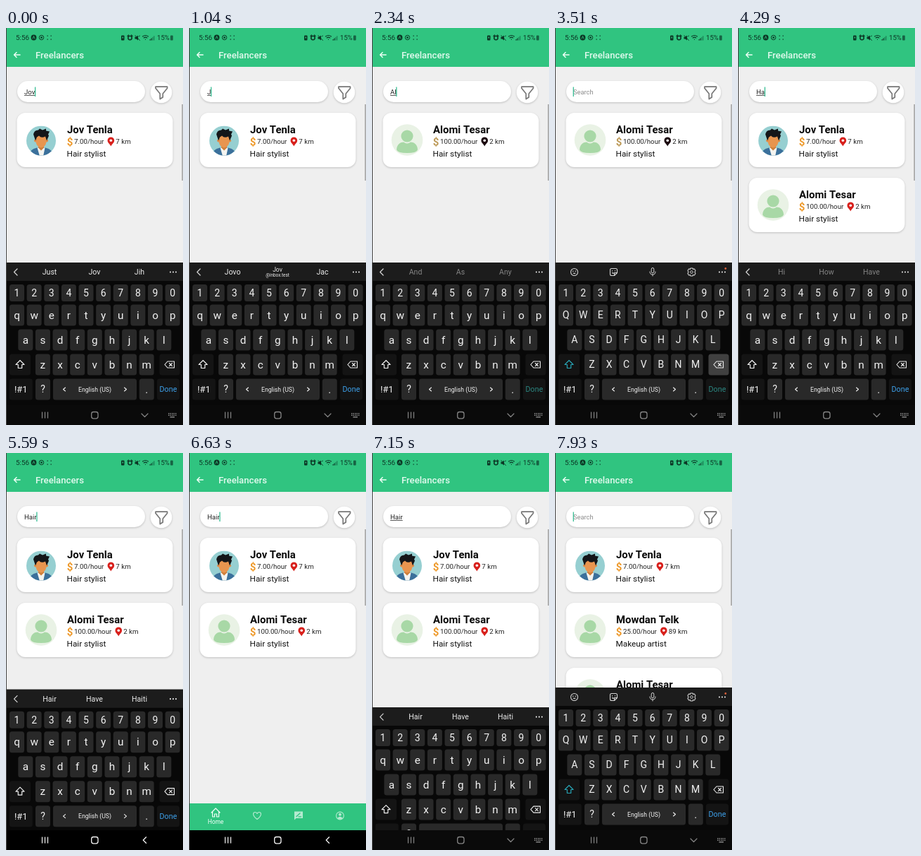
These frames come from a looping animation (252x562 px, 8000 ms). An HTML page with a canvas:

```html
<!DOCTYPE html>
<html lang="en">
<head>
<meta charset="utf-8">
<title>Freelancer search</title>
<style>
html, body { margin: 0; width: 100%; height: 100%; overflow: hidden; background: #efefef; }
canvas { display: block; width: 100vw; height: 100vh; }
</style>
</head>
<body>
<canvas id="stage"></canvas>
<script>
const W = 252, H = 562, LOOP = 8000;
const GREEN = '#30c480', KEY = '#292929', DARK_KEY = '#141414';
const canvas = document.getElementById('stage');
const ctx = canvas.getContext('2d');

const people = [
  { name: 'Jov Tenla', price: '7.00', km: 7, job: 'Hair stylist', portrait: true },
  { name: 'Mowdan Telk', price: '25.00', km: 89, job: 'Makeup artist' },
  { name: 'Alomi Tesar', price: '100.00', km: 2, job: 'Hair stylist' }
];

// Search field contents: [start time, text]
const edits = [
  [0, 'Jov'], [520, 'Jo'], [780, 'J'], [1300, ''],
  [1820, 'A'], [2210, 'Al'], [3250, 'A'], [3510, ''],
  [3900, 'H'], [4160, 'Ha'], [4420, 'Hai'], [4680, 'Hair'],
  [7410, 'Hai'], [7540, 'Ha'], [7670, 'H'], [7800, '']
];

const hints = {
  Jov: ['Just', 'Jov', 'Jih'], Jo: ['Job', 'Jov', 'Join'], J: ['Jovo', 'Jov|@inbox.test', 'Jac'],
  A: ['And', 'As', 'Any'], Al: ['All', 'Also', 'Always'],
  H: ['Hi', 'How', 'Have'], Ha: ['Have', 'Has', 'Happy'],
  Hai: ['Hair', 'Hai', 'Haiti'], Hair: ['Hair', 'Have', 'Haiti']
};

const HIDE = 5590, SHOW = 7020, SLIDE = 260;
const clamp = v => Math.max(0, Math.min(1, v));
const ease = v => 1 - (1 - v) ** 3;
const editAt = t => Math.max(0, edits.findLastIndex(e => e[0] <= t));

function box(x, y, w, h, r, fill) {
  ctx.beginPath();
  ctx.roundRect(x, y, w, h, r);
  ctx.fillStyle = fill;
  ctx.fill();
}

function disc(x, y, r, fill) {
  ctx.beginPath();
  ctx.arc(x, y, r, 0, 7);
  ctx.fillStyle = fill;
  ctx.fill();
}

function ring(x, y, r, color, width = 1) {
  ctx.beginPath();
  ctx.arc(x, y, r, 0, 7);
  ctx.strokeStyle = color;
  ctx.lineWidth = width;
  ctx.stroke();
}

function text(s, x, y, size, color, weight = 400, align = 'left') {
  ctx.font = `${weight} ${size}px Roboto, sans-serif`;
  ctx.textAlign = align;
  ctx.fillStyle = color;
  ctx.fillText(s, x, y);
  return ctx.measureText(s).width;
}

// Path around (x, y); filled when no line width is given
function shape(d, x, y, color, width) {
  ctx.save();
  ctx.translate(x, y);
  const p = new Path2D(d);
  if (width) {
    ctx.strokeStyle = color;
    ctx.lineWidth = width;
    ctx.lineJoin = ctx.lineCap = 'round';
    ctx.stroke(p);
  } else {
    ctx.fillStyle = color;
    ctx.fill(p);
  }
  ctx.restore();
}

function raised(draw) {
  ctx.save();
  ctx.shadowColor = 'rgba(0,0,0,.2)';
  ctx.shadowBlur = 3;
  ctx.shadowOffsetY = 1;
  draw();
  ctx.restore();
}

function header() {
  const ink = '#0c3524';
  box(0, 0, W, 55, 0, GREEN);
  text('5:56', 14, 17, 9.8, ink);
  disc(39.5, 13.5, 3.9, ink);
  shape('M-1.5 1.5L0-2L1.5 1.5', 39.5, 13.5, GREEN, 0.9);
  ring(50.5, 13.5, 3.2, ink, 1);
  disc(50.5, 13.5, 1.3, ink);
  for (const dx of [0, 5]) for (const dy of [0, 5]) box(58.5 + dx, 10.5 + dy, 1.3, 1.3, 0, ink);
  box(164, 10.5, 4.5, 7, 1, ink);
  box(165.5, 12.5, 1.5, 2, 0, GREEN);
  ring(176.5, 14, 2.7, ink, 1.5);
  shape('M-3.5-2.5L-2-4M3.5-2.5L2-4', 176.5, 14, ink, 1.2);
  shape('M-3.5-1.5H-1.5L1-3.5V3.5L-1.5 1.5H-3.5Z', 187, 14, ink);
  shape('M-3-3.5L3.5 3.5M2-2L3.5-3', 187, 14, ink, 0.9);
  shape('M-4-2Q0-5 4-2M-2.3 0Q0-1.8 2.3 0M0 2V2.2', 198.5, 14, ink, 1.1);
  for (let i = 0; i < 4; i++) box(204.5 + i * 1.9, 16 - i * 1.6, 1.2, 1.5 + i * 1.6, 0, i < 2 ? ink : '#1c8054');
  text('15%', 215, 17, 9.6, ink);
  box(234, 10.5, 3.8, 7, 1, '#176444');
  shape('M4.5 0H-4M-.5-3.5L-4 0L-.5 3.5', 15.5, 38, '#eafff4', 1.5);
  text('Freelancers', 42, 43, 13.2, '#e2faee', 500);
}

function searchBar(t, edit, typing) {
  raised(() => {
    box(16, 75, 182, 30, 15, '#fff');
    disc(221, 91, 15.3, '#fff');
  });
  shape('M-8.3-8.3H8.3V-6.3L2 1.5V6.5L-2 9V1.5L-8.3-6.3Z', 221.3, 91.5, '#777', 1.7);
  const s = edit[1], x = 26;
  let w = 0;
  if (s) {
    w = text(s, x, 94, 9.6, '#222');
    if (typing) box(x, 95.2, w, 0.8, 0, '#333');
  } else {
    text('Search', x, 94, 9.3, '#8c8c8c');
  }
  if ((t - edit[0]) % 900 < 500) box(x - 0.4 + w, 83.5, 1.3, 13.5, 0, '#35bd92');
}

function portrait(x, y) {
  ctx.save();
  ctx.beginPath();
  ctx.arc(x, y, 21, 0, 7);
  ctx.clip();
  box(x - 21, y - 21, 42, 42, 0, '#96cfd1');
  shape('M-17 22Q-17 12-6 10H6Q17 12 17 22Z', x, y, '#3b709b');
  shape('M-5.5 10L-2 22H3L5.5 10Z', x, y, '#f4f4f0');
  shape('M-4 5V10L0 14L4 10V5Z', x, y, '#cf7f3a');
  disc(x - 8, y, 2, '#e08d48');
  disc(x + 8, y, 2, '#e08d48');
  shape('M-7.5-8H7.5V2Q6 9 0 10Q-6 9-7.5 2Z', x, y, '#e8954f');
  shape('M-8 0L-11-9Q-10-15-4-15L-2-17L2-15L7-17L7-14L12-13L10-9L11-7L8 0L6-6Q0-3-3-7L-6-5Z', x, y, '#141619');
  ctx.restore();
}

function placeholder(x, y) {
  disc(x, y, 22.3, '#e9f2e5');
  shape('M-15 14C-15 6-9 3-5 3Q0 7 5 3C9 3 15 6 15 14Q13 18.5 0 18.5T-15 14Z', x, y, '#a8d8a6');
  disc(x, y - 5.5, 8.6, '#a8d8a6');
}

function card(p, y, muted) {
  raised(() => box(15.5, y, 222, 77, 12, '#fff'));
  if (p.portrait) portrait(50, y + 39.5);
  else placeholder(50, y + 38.5);
  text(p.name, 87, y + 28.5, 14.9, '#0a0a0a', 700);
  text('$', 86.8, y + 45.8, 15, muted ? '#bd9a58' : '#ee9a2c', 700);
  const w = text(p.price + '/hour', 97, y + 44, 9.7, '#222');
  const x = 107 + w;
  shape('M0 6.5C-1.5 3-4.8 1.5-4.8-1.8A4.8 4.8 0 1 1 4.8-1.8C4.8 1.5 1.5 3 0 6.5Z', x, y + 41, muted ? '#1c0a10' : '#d8201c');
  disc(x, y + 39.2, 1.8, '#fff');
  text(p.km + ' km', x + 7, y + 44, 9.7, '#222');
  text(p.job, 86.5, y + 62, 11.8, '#111');
}

function tabs() {
  const pale = '#b4ead0';
  box(0, 496, W, 38, 0, GREEN);
  shape('M-6 0L0-6L6 0M-4.5-1V6H-1.5V2H1.5V6H4.5V-1', 38, 509, '#f2fff8', 1.2);
  text('Home', 38, 525, 8.4, '#f2fff8', 400, 'center');
  shape('M0 5C-8-1-5.5-5-3-5Q-1-5 0-3Q1-5 3-5C5.5-5 8-1 0 5Z', 97, 513.5, pale, 1.2);
  shape('M-6-5.5H6V4H-3.5L-6 6.5Z', 156, 513, pale);
  shape('M-3 1.5L2-3M0 1.8H3.5', 156, 513, GREEN, 1.3);
  ring(215, 513.5, 5.4, pale, 1.1);
  disc(215, 511.8, 2, pale);
  shape('M-3.8 3.5Q0-1 3.8 3.5Q0 6.5-3.8 3.5Z', 215, 513.5, pale);
}

function key(x, y, w, h, label, size, fill = KEY, color = '#f2f2f2') {
  box(x - w / 2, y - h / 2, w, h, 3.5, fill);
  if (label) text(label, x, y + size * 0.35, size, color, 400, 'center');
}

function words(list) {
  [62, 126, 190].forEach((x, i) => {
    const [word, tail] = list[i].split('|');
    text(word, x, tail ? 344.5 : 349, tail ? 8.6 : 10.6, '#ececec', 400, 'center');
    if (tail) text(tail, x, 352, 6.4, '#ececec', 400, 'center');
  });
}

function toolbar() {
  const c = '#d4d4d4';
  ring(27.5, 345.5, 5, c, 1.1);
  disc(25.7, 344.3, 0.8, c);
  disc(29.3, 344.3, 0.8, c);
  shape('M-2.5 1.3Q0 4.2 2.5 1.3Z', 27.5, 345.5, c);
  shape('M-5-3Q-5-5-3-5H3Q5-5 5-3V1L1 5H-3Q-5 5-5 3ZM5 1H1V5M-2-2V-1.5M2-2V-1.5M-2 1Q-1 2 0 1.5', 83.5, 345.5, c, 1.1);
  shape('M-1.8-3.7A1.8 1.8 0 0 1 1.8-3.7V0A1.8 1.8 0 0 1-1.8 0ZM-4 0Q-4 4 0 4T4 0M0 4V6', 139, 345, c, 1);
  shape('M-1.5-5.5H1.5L2-4L4-4.5L5.5-2L4.5 0L5.5 2L4 4.5L2 4L1.5 5.5H-1.5L-2 4L-4 4.5L-5.5 2L-4.5 0L-5.5-2L-4-4.5L-2-4Z', 194.5, 345.5, c, 1.1);
  ring(194.5, 345.5, 1.8, c, 1);
  disc(242.8, 340.5, 1.4, '#d9603c');
}

function keyboard(t, index, muted) {
  const [start, s] = edits[index];
  const before = index ? edits[index - 1][1] : '';
  const caps = !s;
  box(0, 332, W, 230, 0, '#080808');
  box(0, 332, W, 26, 0, '#1c1c1c');
  if (caps) {
    toolbar();
  } else {
    const p = clamp((t - start) / 260);
    const old = before && p < 0.7;
    ctx.save();
    ctx.globalAlpha = old ? 1 - p : before ? p : 1;
    words(hints[old ? before : s]);
    ctx.restore();
    shape('M2-4.5L-2.5 0L2 4.5', 14, 345.5, '#d8d8d8', 1.2);
  }
  for (const x of [234, 238, 242]) disc(x, 345.5, 1.05, '#e4e4e4');

  const row = (chars, x, y, h, size) =>
    [...chars].forEach((c, i) => key(x + i * 24.63, y, 21, h, caps ? c.toUpperCase() : c, size));
  const size = caps ? 14 : 15.3;
  row('1234567890', 15.5, 375, 24, 14);
  row('qwertyuiop', 15.5, 406.5, 30, size);
  row('asdfghjkl', 27.8, 441.5, 30, size);
  row('zxcvbnm', 52.4, 476.5, 30, size);

  key(20, 476.5, 30, 30, '', 0, DARK_KEY);
  shape('M0-6L6 0H2.7V5H-2.7V0H-6Z', 20, 476.5, caps ? '#27a3b4' : '#eee', 1.2);
  const pressed = s.length < before.length && t - start < 120;
  key(233, 476.5, 29, 30, '', 0, pressed ? '#404040' : DARK_KEY);
  shape('M-7 0L-3-4.5H6.5V4.5H-3ZM-.5-2L3.5 2M3.5-2L-.5 2', 233, 476.5, '#eee', 1.1);

  key(21.3, 511.5, 33, 30, '!#1', 13, DARK_KEY);
  key(52.5, 511.5, 21, 30, '?', 14);
  key(126.5, 511.5, 119, 30, 'English (US)', 8.7);
  shape('M1.5-2.5L-1.5 0L1.5 2.5', 83, 511.5, '#eee', 1.1);
  shape('M-1.5-2.5L1.5 0L-1.5 2.5', 170, 511.5, '#eee', 1.1);
  key(200.3, 511.5, 21, 30, '.', 15);
  key(231, 511.5, 32, 30, 'Done', 10.8, DARK_KEY, muted ? '#2b8580' : '#3d9fe8');
}

function navBar(open) {
  const c = open ? '#858585' : '#f4f4f4';
  box(0, 534, W, 28, 0, open ? '#0a0a0a' : '#000');
  for (const x of [51.5, 55.5, 59.5]) box(x - 0.6, 543.5, 1.2, 9, 0, c);
  ctx.beginPath();
  ctx.roundRect(121.7, 543.5, 9.3, 9.3, 2.8);
  ctx.strokeStyle = c;
  ctx.lineWidth = 1.3;
  ctx.stroke();
  if (!open) return shape('M2-4.2L-2.2 0L2 4.2', 197.5, 548, c, 1.3);
  shape('M-4.5-2L0 2.5L4.5-2', 197.5, 548, c, 1.2);
  for (let i = 0; i < 5; i++) for (let j = 0; j < 2; j++) box(231 + i * 2.5, 545 + j * 2.5, 1.5, 1.5, 0, c);
  box(233.5, 550, 6.5, 1.5, 0, c);
}

function draw(t) {
  const index = editAt(t);
  const muted = t >= 1820 && t < 3900;
  const hidden = t < SHOW
    ? ease(clamp((t - HIDE) / SLIDE))
    : 1 - ease(clamp((t - SHOW) / SLIDE));
  const open = t < HIDE || t >= SHOW;

  box(0, 0, W, H, 0, '#efefef');
  // Results trail the typed query slightly
  const query = edits[editAt(t - 120)][1];
  people
    .filter(p => p.name.startsWith(query) || p.job.startsWith(query))
    .forEach((p, i) => card(p, 120 + i * 92, muted));
  searchBar(t, edits[index], open);
  box(250.3, 108, 1.7, 108, 0, '#a9a9a9');
  header();
  if (hidden > 0) tabs();
  if (hidden < 1) {
    ctx.save();
    ctx.translate(0, hidden * 230);
    keyboard(t, index, muted);
    ctx.restore();
  }
  navBar(open);
  box(0, 0, 1, H, 0, '#444');
}

function fit() {
  const k = window.devicePixelRatio || 1;
  canvas.width = Math.round(innerWidth * k);
  canvas.height = Math.round(innerHeight * k);
}

const begin = performance.now();
function frame() {
  ctx.setTransform(canvas.width / W, 0, 0, canvas.height / H, 0, 0);
  draw((performance.now() - begin) % LOOP);
  requestAnimationFrame(frame);
}

addEventListener('resize', fit);
fit();
frame();
</script>
</body>
</html>
```
